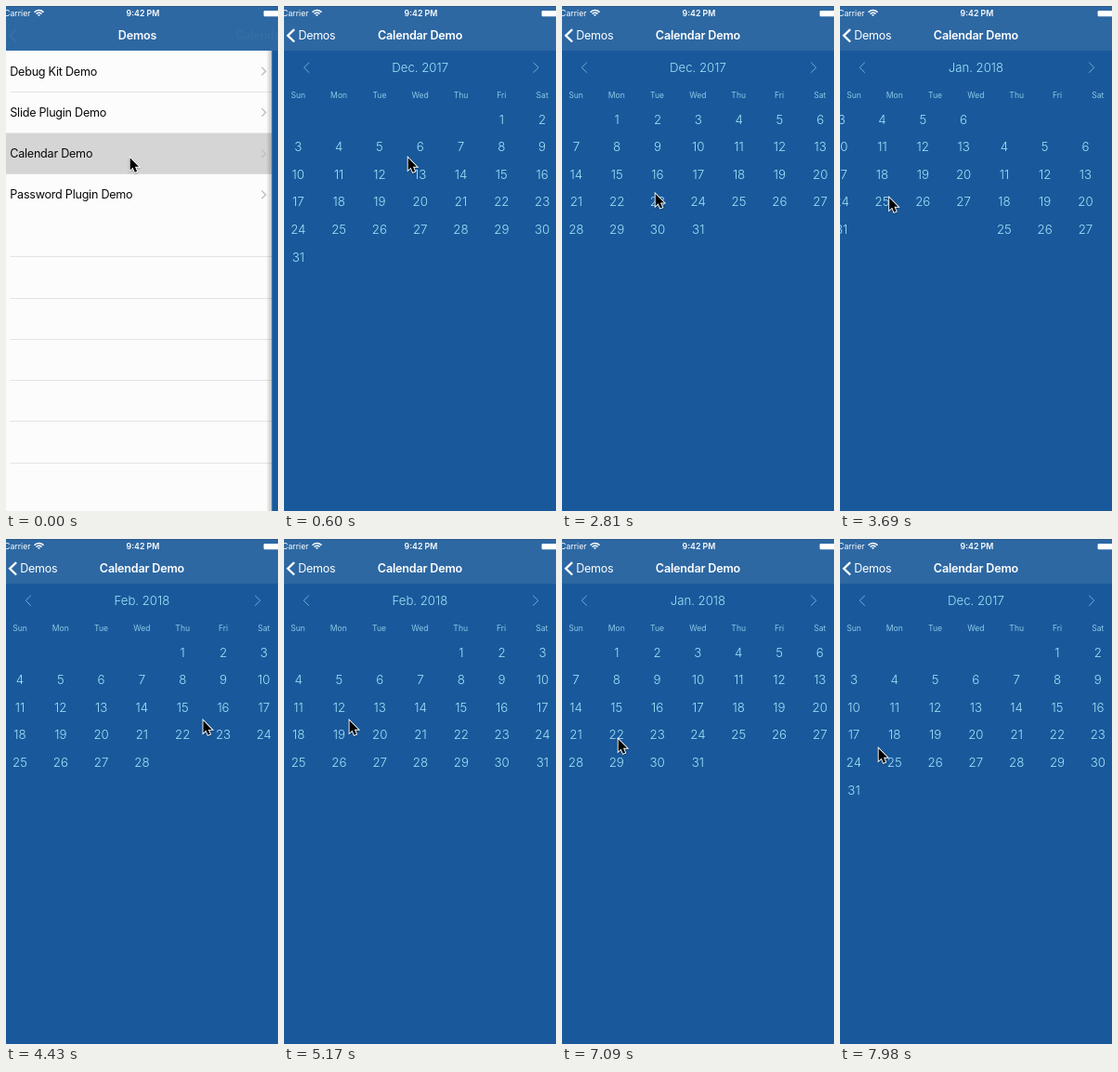
Animation, 293 px wide and 543 px high, one loop 8 s. Source, as an HTML page with a canvas:

```html
<!DOCTYPE html>
<html lang="en">
<head>
<meta charset="utf-8">
<title>Calendar Demo</title>
<style>
html, body { margin: 0; width: 100%; height: 100%; overflow: hidden; background: #19599b; }
canvas { display: block; width: 293px; height: 543px; }
</style>
</head>
<body>
<canvas id="stage"></canvas>
<script>
const W = 293, H = 543, LOOP = 8000, TICK = 147.7;
const LEFT = -6.9, PAGE = 306.6, CELL = PAGE / 7, MID = LEFT + PAGE / 2;
const NAV_H = 48, ROW_H = 44.25;
const NAV = '#2d68a3', BODY = '#19599b', INK = '#a3e2f9', ARROW = '#6faedb';
const DAYS = ['Sun', 'Mon', 'Tue', 'Wed', 'Thu', 'Fri', 'Sat'];
const MONTHS = ['Dec. 2017', 'Jan. 2018', 'Feb. 2018', 'Mar. 2018'];
const DEMOS = ['Debug Kit Demo', 'Slide Plugin Demo', 'Calendar Demo', 'Password Plugin Demo'];

// Three swipes forward, then three back: start time and grab point
const SWIPES = [
  { start: 2212, x: 184, y: 199 },
  { start: 3502, x: 196, y: 206 },
  { start: 4610, x: 213, y: 195 },
  { start: 5460, x: 70, y: 195 },
  { start: 6300, x: 149, y: 187 },
  { start: 7220, x: 60, y: 215 }
].map((s, i) => ({ ...s, from: Math.min(i, 6 - i), to: Math.min(i + 1, 5 - i) }));
const DRAG = 190, DRAG_PART = 0.468, SETTLE = 66, LABEL_DELAY = 420, PAUSE = 140;
const FIRST = { x: 133, y: 163 }, LAST = { x: 41, y: 225 };

const canvas = document.getElementById('stage');
const ctx = canvas.getContext('2d');
const dpr = window.devicePixelRatio || 1;
canvas.width = Math.round(W * dpr);
canvas.height = Math.round(H * dpr);

const lerp = (a, b, u) => a + (b - a) * u;
const clamp = u => Math.max(0, Math.min(1, u));
const smooth = u => u * u * (3 - 2 * u);
const lastSwipe = t => SWIPES.filter(s => t >= s.start).pop();

function rect(x, y, w, h, color) {
  ctx.fillStyle = color;
  ctx.fillRect(x, y, w, h);
}

function text(str, x, y, size, color, { weight = 400, align = 'center', spacing = 0 } = {}) {
  ctx.font = `${weight} ${size}px Inter, Roboto, sans-serif`;
  ctx.letterSpacing = spacing + 'px';
  ctx.textAlign = align;
  ctx.fillStyle = color;
  ctx.fillText(str, x, y + size * 0.364);
}

// Chevron centred on x, y; dir 1 points right, -1 left
function chevron(x, y, w, h, dir, color, width) {
  const d = dir * w / 2;
  ctx.beginPath();
  ctx.moveTo(x - d, y - h / 2);
  ctx.lineTo(x + d, y);
  ctx.lineTo(x - d, y + h / 2);
  ctx.strokeStyle = color;
  ctx.lineWidth = width;
  ctx.stroke();
}

function faded(alpha, draw) {
  ctx.save();
  ctx.globalAlpha = alpha;
  draw();
  ctx.restore();
}

function shifted(dx, draw) {
  ctx.save();
  ctx.translate(dx, 0);
  draw();
  ctx.restore();
}

function pushProgress(t) {
  const s = (t + 22) * 0.015;
  return 1 - (1 + s) * Math.exp(-s);
}

// The page follows the drag, then glides to rest
function pageAt(t) {
  const s = lastSwipe(t);
  if (!s) return 0;
  const age = t - s.start;
  const u = age < DRAG
    ? DRAG_PART * (age / DRAG) ** 2
    : 1 - (1 - DRAG_PART) * Math.exp((DRAG - age) / SETTLE);
  return lerp(s.from, s.to, u);
}

function labelAt(t) {
  const done = lastSwipe(t - DRAG - LABEL_DELAY);
  return MONTHS[done ? done.to : 0];
}

// The pointer drags the page, then travels to the next grab point
function pointerAt(t) {
  const s = lastSwipe(t);
  if (s && t < s.start + DRAG) return { x: s.x - (pageAt(t) - s.from) * PAGE, y: s.y };
  const a = s ? { x: s.x - (s.to - s.from) * DRAG_PART * PAGE, y: s.y } : FIRST;
  const b = SWIPES.find(n => n.start > t) || { ...LAST, start: LOOP + PAUSE - TICK / 2 };
  const leave = s ? s.start + DRAG : 900;
  const u = smooth(clamp((t - leave) / (b.start - PAUSE - leave)));
  return { x: lerp(a.x, b.x, u), y: lerp(a.y, b.y, u) };
}

function drawList() {
  rect(LEFT, NAV_H, PAGE + 10, H, '#fdfdfd');
  rect(LEFT, NAV_H + 2 * ROW_H, PAGE + 10, ROW_H, '#d6d6d6');
  for (let n = 1; n <= 10; n++) {
    if (n === 1 || n > DEMOS.length) rect(8.3, Math.round(NAV_H + n * ROW_H), PAGE, 0.8, '#dfdfe1');
  }
  DEMOS.forEach((name, i) => {
    const y = NAV_H + (i + 0.5) * ROW_H;
    text(name, 8.3, y, 12.6, '#080808', { align: 'left', spacing: -0.25 });
    chevron(281.6, y, 4.4, 8.6, 1, '#c2c2c7', 1.4);
  });
}

function drawMonth(page) {
  const start = new Date(2017, 11 + page, 1).getDay();
  const count = new Date(2017, 12 + page, 0).getDate();
  for (let d = 1; d <= count; d++) {
    const cell = start + d - 1;
    const x = LEFT + (cell % 7 + 0.5) * CELL;
    const y = 122 + Math.floor(cell / 7) * 29.55;
    text(d, x, y, 13.3, INK, { weight: 300 });
  }
}

function drawCalendar(t) {
  rect(LEFT, NAV_H, PAGE, H, BODY);
  chevron(24, 66.2, 5.6, 11, -1, ARROW, 1);
  chevron(271, 66.2, 5.6, 11, 1, ARROW, 1);
  text(labelAt(t), MID, 66.6, 13.2, INK, { weight: 300 });
  DAYS.forEach((day, i) => text(day, LEFT + (i + 0.5) * CELL, 96.2, 8.6, '#8cc8e8'));
  const page = pageAt(t);
  MONTHS.forEach((_, i) => {
    if (Math.abs(i - page) < 1) shifted((i - page) * PAGE, () => drawMonth(i));
  });
}

function drawStatus() {
  text('Carrier', 26.5, 8.2, 8.7, '#fff', { align: 'right' });
  text('9:42 PM', 147.5, 8.2, 8.8, '#fff', { weight: 600 });
  for (let r = 1.4; r < 7; r += 2.7) {
    ctx.beginPath();
    ctx.arc(35.5, 11.3, r, -Math.PI * 0.76, -Math.PI * 0.24);
    ctx.strokeStyle = '#fff';
    ctx.lineWidth = 1.5;
    ctx.stroke();
  }
  ctx.beginPath();
  ctx.roundRect(277.6, 5, 18, 6.2, 1.2);
  ctx.fillStyle = '#fff';
  ctx.fill();
}

function drawNav(p) {
  rect(0, 0, W, NAV_H, NAV);
  rect(0, 0, W, 1, '#28598c');
  drawStatus();
  const titleX = lerp(MID, 35.3, p);
  const bold = { weight: 600, spacing: -0.2 };
  faded(1 - p, () => text('Demos', titleX, 31.6, 12.6, '#fff', bold));
  faded(p, () => {
    if (p > 0.3) text('Demos', titleX, 31.6, 12.5, '#fff', { spacing: -0.3 });
    chevron(7.6, 31.8, 7, 13.4, -1, '#fff', 2.3);
    text('Calendar Demo', MID + (1 - p) * PAGE / 2, 31.6, 12.6, '#fff', bold);
  });
}

function drawPointer({ x, y }) {
  ctx.save();
  ctx.translate(x, y - 0.5);
  ctx.scale(0.93, 0.93);
  ctx.beginPath();
  [[0.7, 0.8], [0.7, 15], [3.9, 12], [6.2, 17.4], [8.7, 16.4], [6.4, 11.1], [10.8, 11.1]]
    .forEach(([px, py]) => ctx.lineTo(px, py));
  ctx.closePath();
  ctx.strokeStyle = '#fff';
  ctx.lineWidth = 2;
  ctx.shadowColor = 'rgba(0,0,0,0.3)';
  ctx.shadowBlur = 2 * dpr;
  ctx.shadowOffsetY = dpr;
  ctx.stroke();
  ctx.shadowColor = 'transparent';
  ctx.fillStyle = '#000';
  ctx.fill();
  ctx.restore();
}

function drawShadow(x) {
  const g = ctx.createLinearGradient(x - 6, 0, x, 0);
  g.addColorStop(0, 'rgba(0,0,0,0)');
  g.addColorStop(1, 'rgba(0,0,0,0.22)');
  rect(x - 6, NAV_H, 6, H, g);
}

function draw(t) {
  ctx.setTransform(dpr, 0, 0, dpr, 0, 0);
  rect(0, 0, W, H, BODY);
  const p = t < 700 ? pushProgress(t) : 1;
  const dx = (1 - p) * PAGE;
  if (p < 0.99) {
    shifted(-0.3 * p * PAGE, drawList);
    rect(0, NAV_H, W, H, `rgba(0,0,0,${0.1 * p})`);
    drawShadow(LEFT + dx);
  }
  shifted(dx, () => drawCalendar(t));
  drawNav(p);
  drawPointer(pointerAt(t));
}

// The screen updates in steps, holding each pose for one tick
const begin = performance.now();
function loop() {
  const t = (performance.now() - begin) % LOOP;
  draw(Math.floor((t + 10) / TICK) * TICK);
  requestAnimationFrame(loop);
}
loop();
</script>
</body>
</html>
```
